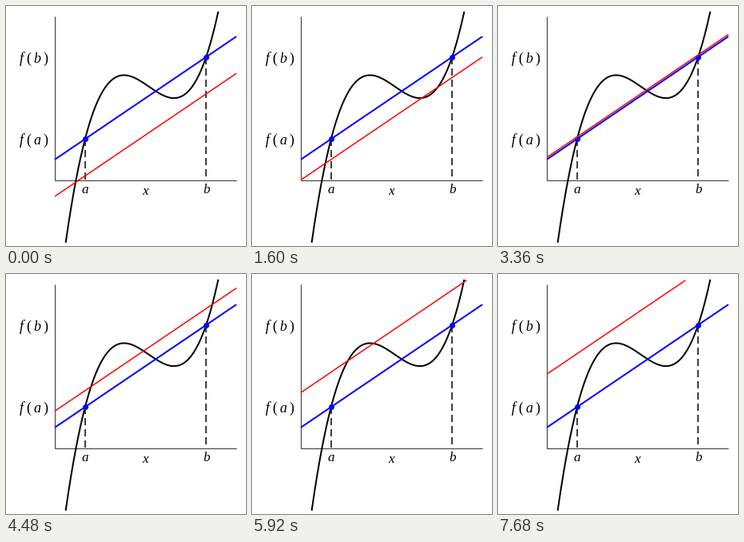
Recreate the animation shown at these times as a matplotlib script. Size 300x300 px, loop 7.84 s.

```python
import matplotlib.pyplot as plt
import numpy as np
from matplotlib.animation import FuncAnimation

SIZE, DPI = 300, 100
X0, Y0 = 61.0, 217.5          # origin in pixels
SX, SY = 227 / 3, 51.25       # pixels per unit
A, B, MID = 0.5, 2.5, 5 / 3
FRAMES, HOLD = 49, 2
START, STEP = -0.4, 0.05


def f(x):
    return x + 0.5 + 2 * (x - A) * (x - B) * (x - MID)


def pt(px):
    return px * 72 / DPI


fig = plt.figure(figsize=(SIZE / DPI, SIZE / DPI), dpi=DPI, facecolor="white")
ax = fig.add_axes([0, 0, 1, 1])
ax.axis("off")
ax.set_xlim(-X0 / SX, (SIZE - X0) / SX)
ax.set_ylim((Y0 - SIZE) / SY, Y0 / SY)


def line(xs, ys, color, width, z, **kw):
    return ax.plot(xs, ys, color=color, lw=pt(width), zorder=z,
                   solid_capstyle="butt", **kw)[0]


def drop(x, z=3):
    """Dashed line from the curve down to the x axis."""
    return line([x, x], [f(x), 0], "black", 1.5, z,
                dashes=(9 / 1.5, 5 / 1.5), dash_capstyle="butt")


def dot(x, color, z):
    return ax.plot([x], [f(x)], "o", color=color, ms=pt(7), mew=0, zorder=z)[0]


def label(px, py, s, size=17, style="italic"):
    return ax.text((px - X0) / SX, (Y0 - py) / SY, s, ha="center",
                   va="baseline", family="Liberation Serif", style=style,
                   size=pt(size), color="black")


def call_label(py, arg):
    label(19.5, py, "f", 18)
    label(28.5, py, "(", 18, "normal")
    label(38.5, py, arg, 18)
    label(49.5, py, ")", 18, "normal")


# Axes, curve and secant
line([0, 0], [0, 4], "#333333", 1, 1)
line([0, 3], [0, 0], "#333333", 1, 1)
xs = np.linspace(0.18, 2.70, 400)
line(xs, f(xs), "black", 2, 4)
line([0, 3], [0.5, 3.5], "blue", 2, 5)

for x, name in ((A, "a"), (B, "b")):
    drop(x)
    dot(x, "blue", 6)
    label(X0 + x * SX, 234, name)
    call_label(Y0 - f(x) * SY + 7, name)
label(174, 236, "x")

# Points where the tangent is parallel to the secant
roots = np.roots([3, -2 * (A + B + MID), A * B + MID * (A + B)])
C_HIGH, C_LOW = sorted(roots.real)
marks = [
    (start, [drop(c), dot(c, "red", 8), label(X0 + c * SX, 234, "c")])
    for start, c in ((7, C_LOW), (40, C_HIGH))
]
red = line([], [], "red", 1.5, 7)


def update(i):
    # The line rests for HOLD extra frames at each tangency
    held = sum(min(max(i - start, 0), HOLD) for start, _ in marks)
    k = START + STEP * (i - held)
    resting = False
    for start, parts in marks:
        on = start <= i <= start + HOLD
        resting |= on
        for p in parts:
            p.set_visible(on)
    top = 4.14 if resting else 4.09
    end = min(3, top - k)
    red.set_data([0, end], [k, k + end])
    return [red]


anim = FuncAnimation(fig, update, frames=FRAMES, interval=160,
                     init_func=lambda: update(0), repeat=True,
                     repeat_delay=0, blit=False)
plt.show()
```
